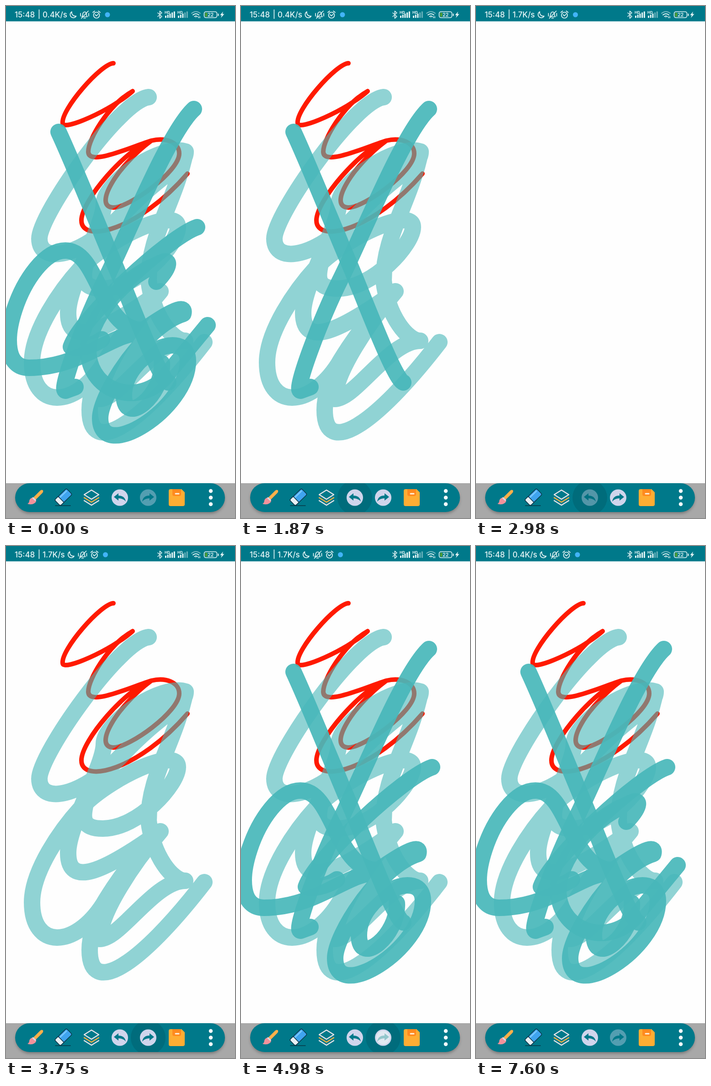
Recreate the animation shown at these times as an HTML page. Size 501x1118 px, loop 7.64 s.

```html
<!DOCTYPE html>
<html lang="en">
<head>
<meta charset="utf-8">
<style>
html, body { margin: 0; width: 100%; height: 100%; overflow: hidden; background: #fefefe; }
svg { display: block; width: 100vw; height: 100vh; }
text { font-family: Inter, Roboto, sans-serif; fill: #e9f6f7; }
.line { fill: none; stroke-linecap: round; stroke-linejoin: round; }
</style>
</head>
<body>
<svg viewBox="0 0 501 1118">
  <defs>
    <clipPath id="pill"><rect x="20" y="1042" width="459" height="63" rx="31.5"/></clipPath>
    <filter id="soft" x="-5%" y="-20%" width="110%" height="150%"><feGaussianBlur stdDeviation="3"/></filter>
    <g id="arrow">
      <circle r="18" fill="#d0d5ec"/>
      <path d="M-13 -1.5L-3 -9.5V-4.500Q11 -4.500 13 8.500Q7 1.500 -3 1.500V6.500Z" fill="#00798a"/>
    </g>
  </defs>
  <rect width="501" height="1118" fill="#fefefe"/>

  <!-- drawing, one path per pen stroke -->
  <g id="art" class="line" stroke="#48b8ba" stroke-width="36" stroke-opacity=".92">
    <path stroke="#ff1a00" stroke-width="10" stroke-opacity="1" d="M235 125C208 126 120 226 124 256
      C124 274 230 228 277 186C225 215 180 290 180 318C180 352 280 305 318 294C350 286 379 298 379 322
      C379 362 270 440 235 440C190 440 240 352 318 294C262 312 165 425 165 468C165 520 290 490 397 366"/>
    <path stroke-opacity=".6" d="M312 199C250 205 73 455 73 508C73 565 165 550 255 455S393 350 393 318
      C340 300 214 385 214 432C250 420 300 360 350 330
      M214 432C214 480 136 610 136 670C136 745 210 715 338 623
      M393 318C370 430 312 500 312 600C322 680 365 731 392 731C325 731 250 858 205 858C205 800 280 690 338 623
      M175 560C165 600 170 617 212 617C290 617 376 520 376 483C376 435 220 510 164 572
      C120 620 57 710 57 778C57 880 150 880 213 782C240 735 290 670 338 623
      C270 690 183 800 183 882C183 985 290 920 434 734"/>
    <path d="M115 275C150 350 210 500 238 565S335 815 355 822"/>
    <path d="M411 225C356 275 266 500 220 592S115 840 130 840L152 832"/>
    <path d="M418 483C355 505 165 680 142 744C150 750 185 745 210 728"/>
    <path d="M300 716C240 705 170 790 50 790C-50 790 40 534 130 534C205 534 205 708 300 708
      C340 680 395 645 388 672C300 700 206 850 206 900C206 1000 398 880 398 775
      C398 700 258 760 258 850C258 920 345 850 341 780"/>
    <path d="M329 602C360 570 365 545 330 565C250 595 180 690 180 750C180 850 305 880 360 795L441 697"/>
  </g>

  <!-- status bar -->
  <rect width="501" height="33.500" fill="#00798a"/>
  <g font-size="17" font-weight="500">
    <text x="19" y="25">15:48</text>
    <text x="69.500" y="24">|</text>
    <text id="rate" x="80" y="25">0.4K/s</text>
  </g>
  <g id="left" class="line" stroke="#e9f6f7" stroke-width="1.700">
    <path d="M144 12.500A7 7 0 1 0 153.500 22A8 8 0 0 1 144 12.500Z"/>
    <path d="M166 23.500Q168 21 168 17Q169 13 172 13Q176 13 176 18Q176 21 178 23.500ZM170 26.500H174M165 27L180 11M163 16V22M181 16V22"/>
    <circle cx="198" cy="20" r="6.500"/>
    <path d="M195 19L198 21.500L201.500 18M190 14L194 11M206 14L202 11"/>
    <circle cx="222" cy="19" r="5.500" fill="#42b4f8" stroke="none"/>
  </g>
  <g class="line" stroke="#e9f6f7" stroke-width="1.600">
    <path d="M332 15L341 23L336.500 27V11L341 15L332 23"/>
    <rect x="433.500" y="12.500" width="28" height="13" rx="4"/>
    <path d="M464.500 17.500V21" stroke-width="2"/>
  </g>
  <rect x="435.500" y="14.500" width="5" height="9" rx="2" fill="#4f9c35"/>
  <text x="447.500" y="23" font-size="11" font-weight="600" text-anchor="middle">22</text>
  <path d="M475 12L468.500 20H472L470 26L477.500 17.500H473.500Z" fill="#e9f6f7"/>
  <g font-size="8" font-weight="700"><text x="347" y="17">HD</text><text x="375" y="17">HD</text></g>
  <g id="bars" fill="#e9f6f7"></g>
  <g class="line" stroke="#e9f6f7" stroke-width="2">
    <path d="M406 16Q415.500 8.500 425 16" opacity=".5"/>
    <path d="M409 19.500Q415.500 14.500 422 19.500M412.500 23Q415.500 21 418.500 23"/>
    <path d="M415.500 25V25.200M421 23V26M424 23V26" stroke-width="1.500"/>
  </g>

  <!-- toolbar -->
  <rect y="1042" width="501" height="76" fill="#a8a8a8"/>
  <rect x="21" y="1046" width="457" height="62" rx="31" fill="#555" opacity=".6" filter="url(#soft)"/>
  <rect x="20" y="1042" width="459" height="63" rx="31.500" fill="#00798a"/>
  <g clip-path="url(#pill)"><circle id="ripple" cy="1073.500" r="38" fill="#003c48"/></g>

  <path d="M59 1074L75 1058Q79 1055 81 1058Q82 1061 79 1064L64 1079Z" fill="#ffb04a"/>
  <path d="M56 1074Q61 1072 65 1076Q68 1082 62 1086Q56 1090 47 1087Q51 1085 51 1080Q52 1076 56 1074Z" fill="#f2929b"/>
  <path d="M59 1074L64 1079" class="line" stroke="#d8e1e4" stroke-width="3"/>

  <path d="M108 1091H141" class="line" stroke="#083945" stroke-width="1.500"/>
  <g transform="translate(125.500 1072.500) rotate(-44)" stroke="#0b3a4c" stroke-width="1.500">
    <rect x="-18" y="-9" width="36" height="18" rx="3" fill="#3fa4ee"/>
    <path d="M-7 -9H-15Q-18 -9 -18 -6V6Q-18 9 -15 9H-7Z" fill="#e8f0f5"/>
    <path d="M-6 -5H15" stroke="#79c8ff" stroke-width="3"/>
  </g>

  <g class="line" stroke-width="2.300" stroke="#e6e4ea">
    <path d="M187 1057L203 1067L187 1077L171 1067Z"/>
    <path d="M171 1073.500L187 1083.500L203 1073.500" stroke="#ffb13d"/>
    <path d="M171 1080L187 1090L203 1080"/>
  </g>

  <use id="undo" href="#arrow" transform="translate(249 1073.500)"/>
  <use id="redo" href="#arrow" transform="translate(311 1073.500) scale(-1 1)"/>
  <circle id="touch" cy="1073.500" r="15" fill="#eef5f6"/>

  <path d="M360 1055H384L391 1062V1088Q391 1092 387 1092H360Q356 1092 356 1088V1059Q356 1055 360 1055Z" fill="#ffad33"/>
  <path d="M364 1055H383V1066Q383 1070 379 1070H368Q364 1070 364 1066Z" fill="#ff8a1f"/>
  <path d="M371 1065H378" class="line" stroke="#fff3e2" stroke-width="3"/>
  <path d="M448 1059V1088" class="line" stroke="#f4fbfc" stroke-width="8.500" stroke-dasharray="0 14.400"/>
</svg>
<script>
const LOOP = 7640, PRESS = 115;
const $ = id => document.getElementById(id);
const set = (id, name, value) => $(id).setAttribute(name, value);
const clamp = v => Math.max(0, Math.min(1, v));
const strokes = [...$('art').children];
const total = strokes.length;

// two signal meters, the second one weaker
for (const x of [348, 376]) for (let i = 0; i < 5; i++) {
  const bar = document.createElementNS('http://www.w3.org/2000/svg', 'rect');
  const h = 5 + i * 2.3;
  const look = { x: x + i * 4.7, y: 26 - h, width: 3, height: h, rx: 1, opacity: x > 360 && i > 2 ? .45 : 1 };
  for (const k in look) bar.setAttribute(k, look[k]);
  $('bars').append(bar);
}

// every stroke is undone, then redone, at a steady pace
const run = (start, gap, x, step) => strokes.map((_, i) => ({ at: start + i * gap, x, step }));
const taps = [...run(1290, 258, 249, -1), ...run(3420, 270, 311, 1)];

function draw(t) {
  let count = total, glow = 0, finger = 0;
  for (const { at, x, step } of taps) {
    const dt = t - at;
    if (dt >= 0) count += step;
    const g = clamp(Math.min((dt + PRESS) / 60, (340 - dt) / 200));
    if (g > 0 && g >= glow) {
      glow = g;
      set('ripple', 'cx', x);
    }
    if (dt > -PRESS && dt < 0) {
      finger = .62;
      set('touch', 'cx', x + 9 * clamp((-dt - 60) / 20));
    }
  }
  strokes.forEach((s, i) => s.setAttribute('visibility', i < count ? 'visible' : 'hidden'));
  set('undo', 'opacity', count > 0 ? 1 : .4);
  set('redo', 'opacity', count < total ? 1 : .4);
  set('ripple', 'opacity', glow * .22);
  set('touch', 'opacity', finger);

  const fast = t >= 2900 && t < 6060;
  $('rate').textContent = fast ? '1.7K/s' : '0.4K/s';
  set('left', 'transform', `translate(${fast ? -4.5 : 0} 0)`);
}

function tick() {
  draw(performance.now() % LOOP);
  requestAnimationFrame(tick);
}
tick();
</script>
</body>
</html>
```
